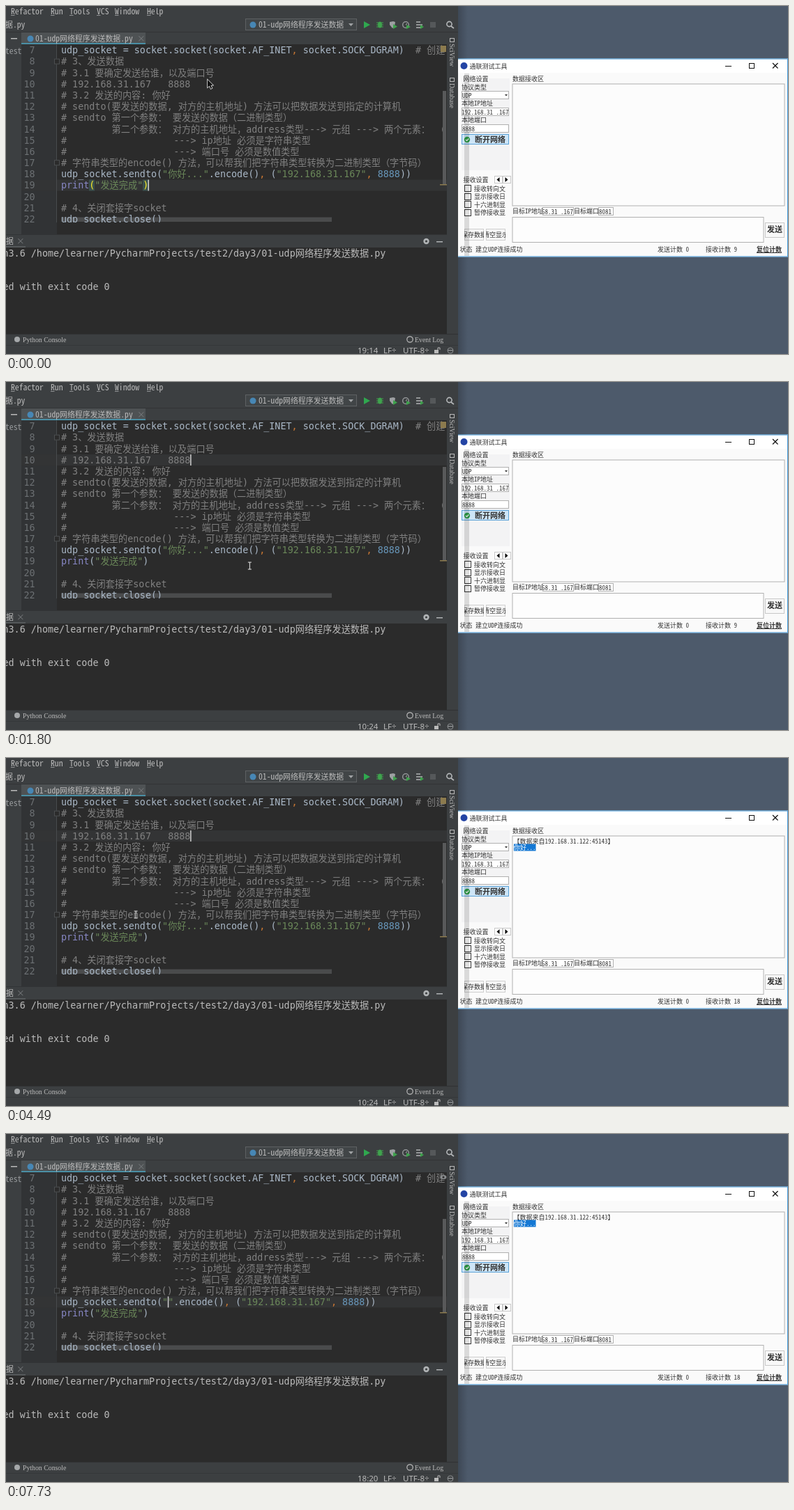
Recreate the animation shown at these times as an HTML page with a canvas. Size 1121x500 px, loop 8000 ms.

```html
<!DOCTYPE html>
<html lang="zh-CN">
<head>
<meta charset="utf-8">
<title>UDP</title>
<style>
html, body { margin: 0; width: 100%; height: 100%; overflow: hidden; background: #4d5a6b; }
canvas { display: block; }
</style>
</head>
<body>
<canvas id="stage" width="1121" height="500"></canvas>
<script>
const g = document.getElementById('stage').getContext('2d');
const CJK = '"Noto Sans CJK SC","Noto Sans CJK",sans-serif';
const HALF = '"Noto Sans Mono CJK SC","Noto Sans Mono",monospace';

// Style: latin size, latin family, CJK size, latin weight, CJK weight
const STYLE = {
  code: [13.4, '"DejaVu Sans Mono",monospace', 13.2, 400, 300],
  ui: [11.7, HALF, 10.9, 400, 300],
  app: [9, HALF, 9, 400, 400],
  bold: [9, HALF, 9, 700, 700],
  big: [11, HALF, 11, 700, 700],
  key: [11, '"Noto Sans",sans-serif', 11, 400, 400],
  status: [11.5, '"Noto Sans",sans-serif', 11, 400, 400],
  tool: [9.8, '"Liberation Serif",serif', 10, 400, 400],
  icon: [9.2, '"Noto Sans",sans-serif', 9, 400, 400]
};

function rect(x, y, w, h, fill) { g.fillStyle = fill; g.fillRect(x, y, w, h); }
function frame(x, y, w, h, line, fill) {
  if (fill) rect(x, y, w, h, fill);
  g.strokeStyle = line; g.lineWidth = 1;
  g.strokeRect(x + .5, y + .5, w - 1, h - 1);
}
function disc(x, y, r, fill) {
  g.fillStyle = fill; g.beginPath(); g.arc(x, y, r, 0, 7); g.fill();
}
function shape(points, fill, line) {
  g.beginPath();
  points.forEach(([x, y]) => g.lineTo(x, y));
  g.closePath();
  if (line) { g.strokeStyle = line; g.lineWidth = 1.5; g.stroke(); }
  g.fillStyle = fill; g.fill();
}
function stroke(points, color, width = 1) {
  g.strokeStyle = color; g.lineWidth = width;
  g.beginPath();
  points.forEach(([x, y], i) => i ? g.lineTo(x, y) : g.moveTo(x, y));
  g.stroke();
}
function clip(x, y, w, h, draw) {
  g.save(); g.beginPath(); g.rect(x, y, w, h); g.clip(); draw(); g.restore();
}

// Draws mixed text centred on y; align 0, .5 or 1. Returns the end x.
function text(s, x, y, color, style = 'ui', align = 0) {
  const [size, family, wide, weight, wideWeight] = STYLE[style];
  const runs = s.match(/[\u3000-\u9fff\uff00-\uffef]+|[^\u3000-\u9fff\uff00-\uffef]+/g) || [];
  const width = r => {
    g.font = r[0] >= '\u3000' ? `${wideWeight} ${wide}px ${CJK}` : `${weight} ${size}px ${family}`;
    return g.measureText(r).width;
  };
  if (align) x -= align * runs.reduce((sum, r) => sum + width(r), 0);
  g.fillStyle = color;
  for (const r of runs) {
    const w = width(r);
    g.fillText(r, x, y + size * .36);
    x += w;
  }
  return x;
}

const PANEL = '#3c3f41', EDIT = '#2b2b2b', FG = '#a9b7c6', UI = '#bbbbbb';
const COMMENT = '#808080', STR = '#6a8759', NUM = '#6897bb', COMMA = '#cc7832', GREEN = '#3fa34d';
const NAME = '01-udp网络程序发送数据';
const lineY = n => 63.5 + (n - 7) * 16.17;

const COMMENTS = {
  8: '# 3、发送数据',
  9: '# 3.1 要确定发送给谁，以及端口号',
  10: '# 192.168.31.167   8888',
  11: '# 3.2 发送的内容: 你好',
  12: '# sendto(要发送的数据, 对方的主机地址) 方法可以把数据发送到指定的计算机',
  13: '# sendto 第一个参数： 要发送的数据（二进制类型）',
  14: '#        第二个参数： 对方的主机地址，address类型---> 元组 ---> 两个元素： （',
  15: '#' + ' '.repeat(19) + '---> ip地址 必须是字符串类型',
  16: '#' + ' '.repeat(19) + '---> 端口号 必须是数值类型',
  17: '# 字符串类型的encode() 方法，可以帮我们把字符串类型转换为二进制类型（字节码）',
  21: '# 4、关闭套接字socket'
};

function code(n, ...parts) {
  let x = 79;
  for (let i = 0; i < parts.length; i += 2) x = text(parts[i], x, lineY(n), parts[i + 1], 'code');
}

function playIcon(x, y) { shape([[x - 4, y - 5], [x + 5, y], [x - 4, y + 5]], '#2fa84f'); }
function bugIcon(x, y) {
  for (const d of [-3, 0, 3]) stroke([[x - 5, y + d], [x + 5, y + d]], GREEN);
  g.fillStyle = GREEN;
  g.beginPath(); g.ellipse(x, y, 3, 4.5, 0, 0, 7); g.fill();
}
function coverIcon(x, y) {
  shape([[x - 5, y - 4], [x, y - 5], [x + 3, y - 4], [x + 2, y + 2], [x - 1, y + 5], [x - 5, y]], '#9da0a2');
  shape([[x, y - 1], [x + 6, y + 2.5], [x, y + 6]], GREEN);
}
function profileIcon(x, y) {
  g.strokeStyle = '#9da0a2'; g.lineWidth = 1.3;
  g.beginPath(); g.arc(x - 1, y, 4.3, 0, 7); g.stroke();
  stroke([[x - 1, y], [x + 1, y - 2]], UI);
  shape([[x, y], [x + 6, y + 3], [x, y + 6]], GREEN);
}
function threadIcon(x, y) {
  for (const d of [-4, 0, 4]) stroke([[x - 5, y + d], [x + (d ? 1 : 4), y + d]], '#b0b3b5', 1.5);
  shape([[x + 1, y], [x + 6, y + 3], [x + 1, y + 6]], GREEN);
}
const pyIcon = (x, y) => disc(x, y, 4.5, '#4787b5');

function editor(t, front) {
  const row = t < 300 ? 19 : t < 5080 ? 10 : 18;
  rect(22, 55, 610, 273, EDIT);
  rect(22, 55, 51, 273, '#313335');
  if (front) rect(22, lineY(row) - 8, 610, 16, '#333435');
  rect(72, 55, 1, 256, '#484b4d');
  rect(79, 303.5, 388, 6.5, '#4a4b4c');
  clip(0, 55, 632, 256, () => {
    for (let n = 7; n < 23; n++) text('' + n, 41.5, lineY(n), '#6c7073', 'code', 1);
    for (const n in COMMENTS) text(COMMENTS[n], 79, lineY(+n), COMMENT, 'code');
    code(7, 'udp_socket = socket.socket(socket.AF_INET', FG, ',', COMMA, ' socket.SOCK_DGRAM)', FG, '  # 创建', COMMENT);
    const content = t < 5810 ? '"你好..."' : t < 6110 ? '' : '""';
    code(18, 'udp_socket.sendto(', FG, content, STR, '.encode()', FG, ',', COMMA, ' (', FG,
      '"192.168.31.167"', STR, ',', COMMA, ' ', FG, '8888', NUM, '))', FG);
    if (row == 19) {
      rect(119, lineY(19) - 8, 8, 16, '#3b514d');
      rect(196, lineY(19) - 8, 8, 16, '#3b514d');
    }
    const paren = row == 19 ? '#ffef28' : FG;
    code(19, 'print', '#8888c6', '(', paren, '"发送完成"', STR, ')', paren);
    code(22, 'udp_socket.close()', FG);
  });
  for (const n of [8, 17]) frame(69, lineY(n) - 4, 8, 8, '#4c4f51', EDIT);
  rect(626, 122, 5, 135, '#58595a');
  rect(622, 256, 10, 1.5, '#8d7c50');
  if ((t >= 7000 && t < 7290) || t >= 7590) {
    g.fillStyle = '#8a8d8f';
    g.beginPath(); g.ellipse(627, 62, 4.5, 3, 0, 0, 7); g.fill();
    disc(627, 62, 1.5, EDIT);
  } else rect(623, 57, 8, 9, '#8c7b4e');

  const caretX = row == 19 ? 204 : row == 10 ? 264.6 : t < 5810 ? 274.8 : t < 6110 ? 224 : 232.3;
  if (t < 2720 || t >= 3890) rect(caretX - .5, lineY(row) - 8, 1.5, 16, '#d0d0d0');
}

function ide(t, front) {
  rect(0, 0, 648, 500, PANEL);
  [['Refactor', 7], ['Run', 64], ['Tools', 91], ['VCS', 130], ['Window', 156], ['Help', 202]].forEach(([s, x]) => {
    text(s, x, 7.5, UI);
    rect(x, 13, 5.5, 1, '#8f9193');
  });
  text('据.py', -1, 27, UI);
  rect(0, 37, 648, 1, '#323436');
  frame(343, 18, 160, 17, '#5e6163', '#414547');
  pyIcon(354, 27);
  text(NAME, 362, 27, UI);
  shape([[491, 25], [498, 25], [494.5, 29]], '#a0a3a5');
  playIcon(517, 27); bugIcon(536, 27); coverIcon(555, 27); profileIcon(574, 27); threadIcon(593, 27);
  rect(608, 23, 8, 8, '#55585a');
  g.strokeStyle = '#b5b8ba'; g.lineWidth = 1.6;
  g.beginPath(); g.arc(635.5, 26, 3.6, 0, 7); g.stroke();
  stroke([[638, 29], [642, 32]], '#b5b8ba', 1.6);

  rect(7, 46, 9, 1.5, UI);
  rect(22, 38, 178, 17, '#4e5254');
  rect(22, 53, 178, 2.5, '#4a8fa5');
  pyIcon(35, 47);
  text(NAME + '.py', 42, 47, UI);
  text('×', 188, 47, '#777a7c');
  if (front) text('test', -1, 65, '#999c9e');
  editor(t, front);

  [['SciView', 50], ['Database', 107]].forEach(([s, y]) => {
    frame(636, y - 4, 7, 6, UI);
    g.save(); g.translate(639.5, y + 4); g.rotate(Math.PI / 2);
    text(s, 0, 0, UI, 'tool');
    g.restore();
  });

  rect(0, 328, 632, 1, '#323436');
  text('据', 0, 338, UI);
  text('×', 15, 338, '#777a7c');
  rect(0, 345, 28, 2, '#55595b');
  disc(602.5, 338, 4.2, '#b0b3b5'); disc(602.5, 338, 1.6, PANEL);
  rect(617, 338, 9, 1.5, '#b0b3b5');
  rect(0, 347, 632, 124, EDIT);
  text('n3.6 /home/learner/PycharmProjects/test2/day3/' + NAME + '.py', -4.5, 355, UI, 'code');
  if (t < 1950 || t >= 2110) text('ed with exit code 0', -4.5, 403.5, UI, 'code');
  rect(0, 471, 648, 1, '#2f3133');
  rect(0, 487, 648, 1, '#34373a');
  disc(16, 479, 4, '#a5a8aa');
  text('Python Console', 24, 479, UI, 'tool');
  g.strokeStyle = UI; g.lineWidth = 1.2;
  g.beginPath(); g.arc(579, 479, 4.2, 0, 7); g.stroke();
  text('Event Log', 586, 479, UI, 'tool');
  text(t < 300 ? '19:14' : t < 5080 ? '10:24' : t < 5810 ? '18:24' : t < 6110 ? '18:19' : '18:20', 504, 495, UI, 'status');
  text('LF÷', 541, 495, UI, 'status');
  text('UTF-8÷', 569, 495, UI, 'status');
  rect(614, 494, 6, 5, UI);
  stroke([[619, 494], [619, 491], [622, 491], [622, 494]], UI);
  g.strokeStyle = '#8a8d8f'; g.beginPath(); g.arc(637, 495, 4, 0, 7); g.stroke();
  rect(633, 494, 8, 1.5, '#8a8d8f');
}

// Label with "_" before its mnemonic, centre y, shortcut (">" opens a submenu)
const MENU = [
  ['Cop_y Reference', 112, 'Ctrl+Alt+Shift+C'], ['_Paste', 128, 'Ctrl+V'],
  ['Paste from Histor_y...', 143, 'Ctrl+Shift+V'], ['Paste S_imple', 159, 'Ctrl+Alt+Shift+V'],
  ['Column Selection _Mode', 174, 'Alt+Shift+Insert'], ['_Refactor', 193, '>'], ['Folding', 211, '>'],
  ['_Go To', 229, '>'], ['Generate...', 245, 'Alt+Insert'],
  [`R_un '${NAME}'`, 262.5, 'Ctrl+Shift+F10', playIcon], [`_Debug '${NAME}'`, 278, '', bugIcon],
  [`Run '${NAME}' with Co_verage`, 294, '', coverIcon], [`Profile '${NAME}'`, 309.5, '', profileIcon],
  [`Concurrency Diagram for '${NAME}'`, 325, '', threadIcon], [`Save '${NAME}'`, 343, '', pyIcon],
  ['Show in Files', 362, ''], ['Open in Terminal', 377.5, ''], ['Local _History', 396, '>'],
  ['Execute Line in Console', 413.5, 'Alt+Shift+E'], ['Run File in Console', 429, ''],
  ['Compare with Clip_board', 445, ''], ['File Encoding', 460.5, ''], ['_Diagrams', 478.5, '>'], ['Create Gist...', 494, '']
];

function menu() {
  rect(0, 488, 290, 12, PANEL);
  text('r or setter method, etc.', -8, 495, UI);
  frame(290, 104, 310, 400, '#56595b', PANEL);
  for (const y of [184, 202, 220, 253, 334, 352, 386.5, 405, 469.5]) rect(291, y, 308, 1, '#515456');
  for (const [label, y, key, icon] of MENU) {
    const color = label == 'Generate...' ? '#777a7c' : UI, at = label.indexOf('_');
    text(label.replace('_', ''), 308, y, color);
    if (at >= 0) {
      const x = text(label.slice(0, at), 308, y, 'transparent');
      rect(x, y + 5.5, 5.5, 1, color);
    }
    if (key == '>') shape([[589, y - 3.5], [593, y - .5], [589, y + 2.5]], UI);
    else text(key, 590, y - .5, color, 'key', 1);
    if (icon) icon(299, y);
  }
  frame(296, 124, 6, 8, UI);
  rect(295, 373, 9, 8, '#a5a8aa');
  stroke([[297, 375], [299, 377], [297, 379]], PANEL);
  frame(295, 440, 6, 9, '#a5a8aa'); rect(299, 443, 5, 3, '#3592c4');
  for (const y of [474, 481]) rect(295, y, 9, 2, '#3592c4');
  rect(297, 475, 1, 6, UI); rect(301, 475, 1, 6, UI);
  disc(299, 494, 4, '#a5a8aa');
}

// Kind (c circle, s square, f folder), colour, label lines; row by row, three columns
const ICONS = [
  ['c', '#4c9a35', 'Oru杀毒'], ['f', '', '正则表达式'], ['c', '#2444a4', 'qLinkHel...'],
  ['s', '#2592d2', 'Oru压缩'], ['c', '#5dbb45', 'Oru安全浏览', '器'], ['s', '#2592d2', 'quillbran...'],
  ['c', '#f0781f', 'Firefox'], ['c', '#8fbf2b', 'Oru安全卫士'], ['s', '#1a74dc', 'Wireshark'],
  ['s', '#171c4c', 'Pattolin'], ['s', '#2fbd8b', 'Oru软件管家'], ['s', '#1a74dc', 'Wireshark-...'],
  ['f', '', 'Quorbo 共', '享文件夹'], ['c', '#58b4ea', 'Talo.exe'], ['s', '#2592d2', 'bolunmte...'],
  ['s', '#2d6c9f', '青禾综合视频', '下载(qhloop)'], ['c', '#dd4a38', 'Nimbra', 'Vortel']
];

function label(s, x, y) {
  g.shadowColor = '#111'; g.shadowBlur = 2; g.shadowOffsetY = 1;
  text(s, x, y, '#fff', 'icon', .5);
  g.shadowColor = 'transparent'; g.shadowBlur = g.shadowOffsetY = 0;
}

function desktopIcons() {
  ['回收站', '通联测试工具', 'tavonet_...'].forEach((s, i) => label(s, 506 + 56 * i, 5));
  ICONS.forEach(([kind, color, ...lines], i) => {
    const x = 506 + 56 * (i % 3), y = 58 + 77.1 * Math.floor(i / 3);
    if (kind == 'c') disc(x, y, 17, color);
    else if (kind == 's') rect(x - 17, y - 17, 34, 34, color);
    else {
      rect(x - 12, y - 16, 20, 32, '#e8bd55');
      shape([[x - 12, y - 16], [x + 3, y - 11], [x + 3, y + 17], [x - 12, y + 14]], '#fbe39a');
    }
    if (i != 1) {
      rect(x - 17, y + 8, 9, 9, '#fff');
      stroke([[x - 15, y + 15], [x - 11, y + 11]], '#1e6fc0', 1.5);
      shape([[x - 13.5, y + 10], [x - 10, y + 10], [x - 10, y + 13.5]], '#1e6fc0');
    }
    lines.forEach((s, k) => label(s, x, y + 25 + 11.5 * k));
  });
}

function app(t) {
  const INK = '#333', LINE = '#b0b0b0', BG = '#fafafa';
  const small = (s, x, y, style = 'app') => text(s, x, y, INK, style);
  const field = (s, x, y, w, dx = 1) => {
    frame(x, y, w, 12, LINE, '#fff');
    clip(x + 1, y, w - 2, 12, () => small(s, x + dx, y + 6.5));
  };
  frame(646, 75.5, 475, 285, '#3d95d8', BG);
  rect(647, 77, 473, 19, '#fff');
  disc(656.5, 86, 5, '#2444a4');
  small('通联测试工具', 664.5, 86.5);
  rect(1031, 86, 9, 1, '#111');
  frame(1065, 82, 8, 8, '#111');
  stroke([[1099, 82], [1106.5, 89.5]], '#111', 1.2);
  stroke([[1106.5, 82], [1099, 89.5]], '#111', 1.2);

  rect(653, 104, 69, 132, '#f3f3f4');
  small('网络设置', 655.5, 105);
  small('协议类型', 653, 116.5);
  field('UDP', 653, 122, 68);
  shape([[715, 127], [719, 127], [717, 129.5]], '#333');
  small('本地IP地址', 653, 140);
  field('192.168.31 .167', 653, 146, 68, 0);
  small('本地端口', 653, 163.5);
  field('8888', 653, 170, 68);
  frame(653, 184, 68, 15, '#5aa2d8', '#cde5f7');
  disc(661, 192, 4.2, '#2fa04a');
  stroke([[659, 192], [660.6, 193.6], [663.3, 190.5]], '#fff', 1.2);
  small('断开网络', 672, 192, 'big');
  small('接收设置', 655.5, 250);
  frame(700, 244, 12, 11, '#c8c8c8', '#fff');
  frame(712, 244, 12, 11, '#c8c8c8', '#fff');
  shape([[707.5, 246], [703.5, 249.5], [707.5, 253]], '#000');
  shape([[715.5, 246], [719.5, 249.5], [715.5, 253]], '#000');
  ['接收转向文', '显示接收日', '十六进制显', '暂停接收显'].forEach((s, i) => {
    const y = 262 + 11.5 * i;
    frame(657, Math.round(y) - 5, 10, 10, '#333', '#fff');
    small(s, 671, y + .5);
  });
  ['保存数据', '清空显示'].forEach((s, i) => {
    const x = 657 + 31 * i;
    frame(x, 320, 28, 17, '#cfcfcf', '#f6f6f6');
    clip(x, 320, 28, 17, () => small(s, x - 4, 329));
  });

  small('数据接收区', 726, 105);
  frame(725.5, 111.5, 391, 176, LINE, '#fcfcfc');
  const got = t >= 2110;
  if (got) {
    small('【数据来自192.168.31.122:45143】', 727.5, 119.5);
    const from = t < 3150 ? 760 : t < 3600 ? 760 - (t - 3150) / 450 * 32 : 728;
    small('你好...', 728, 129);
    if (from < 759) {
      rect(from, 123.5, 759.5 - from, 10, '#1478d4');
      clip(from, 123, 760 - from, 11, () => text('你好...', 728, 129, '#fff', 'app'));
    }
  }
  small('目标IP地址', 726, 295);
  field('68.31 .167', 769, 289, 45, -1);
  small('目标端口', 814, 295);
  field('8081', 849, 289, 22);
  frame(725.5, 303, 361, 37, LINE, '#fdfdfd');
  frame(1088, 311, 28, 22, '#c8c8c8', '#f8f8f8');
  small('发送', 1091, 321.5, 'big');
  small('状态 建立UDP连接成功', 650.5, 350);
  small('发送计数 0', 934, 350);
  small('接收计数 ' + (got ? 18 : 9), 1003, 350);
  small('复位计数', 1076, 350, 'bold');
  rect(1076, 354, 36, 1, INK);
}

// Shadow the editor window casts to its right
function shadow(y, h) {
  const s = g.createLinearGradient(648, 0, 662, 0);
  s.addColorStop(0, 'rgba(0,0,0,.2)');
  s.addColorStop(1, 'rgba(0,0,0,0)');
  rect(648, y, 14, h, s);
}

// Pointer path: time, x, y
const PATH = [
  [0, 289, 106], [300, 289, 106], [910, 346, 256], [1060, 347, 260], [1500, 347, 260],
  [1650, 349, 264], [1800, 349, 264], [2570, 625, 300], [2870, 771, 131], [3000, 771, 131],
  [3150, 760, 129], [3600, 728, 129], [3750, 722, 131], [3890, 714, 138], [4190, 186, 225],
  [4490, 186, 225], [4930, 240, 238], [5080, 275, 241], [5180, 275, 241], [5400, 228, 241], [8000, 228, 241]
];

function pointer(t) {
  if (t >= 5810) return;
  const i = PATH.findIndex(p => p[0] > t), [t0, x0, y0] = PATH[i - 1], [t1, x1, y1] = PATH[i];
  const k = (t - t0) / (t1 - t0), x = x0 + (x1 - x0) * k, y = y0 + (y1 - y0) * k;
  if (t < 1650) {
    const tip = [[0, 0], [0, 11], [2.6, 8.8], [4.6, 13], [6.4, 12], [4.5, 8], [7.6, 7.6]];
    shape(tip.map(([a, b]) => [x + a, y + b]), '#111', '#eee');
  } else {
    const c = x > 646 ? '#111' : '#e8e8e8';
    rect(x - .5, y - 5, 1, 10, c);
    rect(x - 2.5, y - 5.5, 5, 1, c);
    rect(x - 2.5, y + 4.5, 5, 1, c);
  }
}

function draw(t) {
  const front = t < 2720 || t >= 4490;
  rect(0, 0, 1121, 500, '#4d5a6b');
  if (!front) desktopIcons();
  app(t);
  clip(0, 0, front ? 648 : 479, 500, () => ide(t, front));
  if (front) {
    shadow(0, 76);
    shadow(361, 139);
    rect(657, 97, 7, 262, 'rgba(0,0,0,.13)');
  } else rect(454, 0, 25, 500, 'rgba(32,35,46,.35)');
  if (t >= 300 && t < 1650) menu();
  pointer(t);
}

const start = performance.now();
function tick(now) {
  draw(Math.max(0, now - start) % 8000);
  requestAnimationFrame(tick);
}
tick(start);
</script>
</body>
</html>
```
